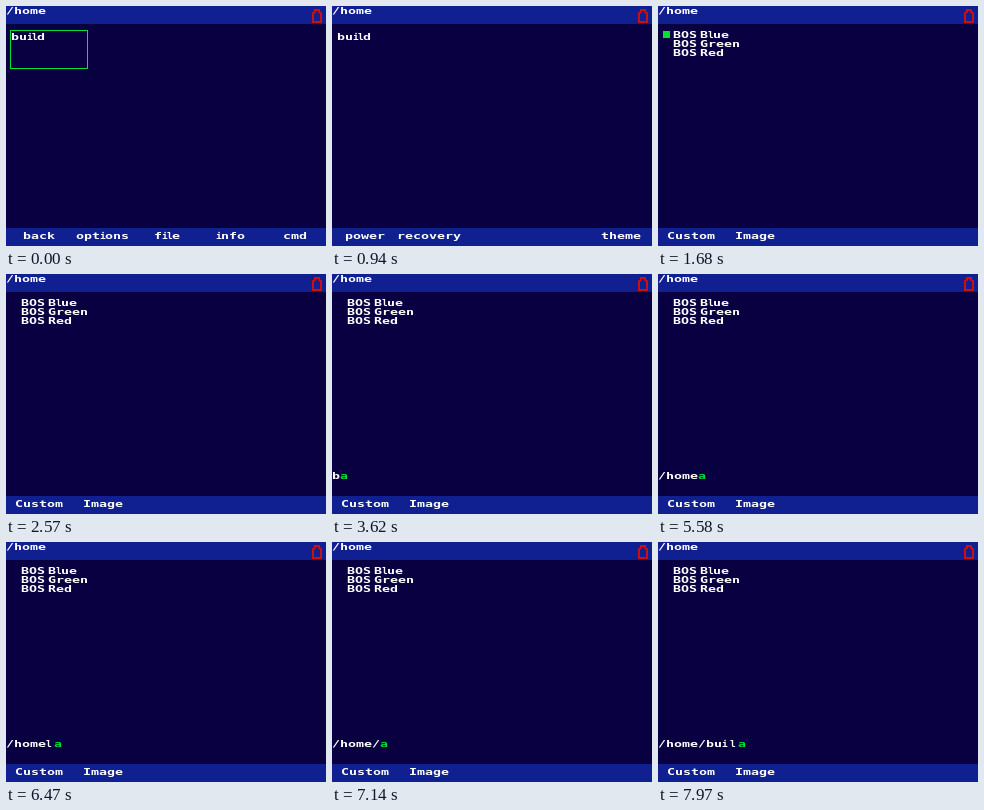
An HTML page with a canvas for the animation above (8 s loop, 320x240 px).

```html
<!DOCTYPE html>
<html lang="en">
<head>
<meta charset="utf-8">
<title>Pocket file manager</title>
<style>
html, body { margin: 0; width: 100%; height: 100%; overflow: hidden; background: #080040; }
canvas { display: block; }
</style>
</head>
<body>
<canvas id="stage" width="320" height="240"></canvas>
<script>
const ctx = document.getElementById('stage').getContext('2d');
const LOOP = 8000, CELL = 8, WIDE = 1.4;
const BAR = '#102090', BODY = '#080040', GREEN = '#00e038', RED = '#cc1010';
const FONT = 'bold 9.5px "DejaVu Sans Mono", monospace';

const screens = [
  [0, 'files', ['back', 'options', 'file', 'info', 'cmd']],
  [890, 'idle', []],
  [940, 'idle', ['power', 'recovery', '', '', 'theme']],
  [1680, 'themes', ['Custom', 'Image']]
];

// Typed text, then the input mode shown as a green cursor
const typing = [
  [2620, '', 'a'], [3620, 'b', 'a'], [4320, '', 'a'],
  [4610, '', '1'], [4760, '/', '1'], [4900, '/', 'a'],
  [5300, '/h', 'a'], [5390, '/ho', 'a'], [5490, '/hom', 'a'], [5580, '/home', 'a'],
  [5730, '/homel', 'a'], [5930, '/homels', 'a'], [6470, '/homel', 'a'], [6610, '/home', 'a'],
  [6910, '/home', '1'], [7050, '/home/', '1'], [7140, '/home/', 'a'],
  [7590, '/home/b', 'a'], [7730, '/home/bu', 'a'],
  [7880, '/home/bui', 'a'], [7970, '/home/buil', 'a']
];

const latest = (list, t) => list.filter(step => step[0] <= t).pop();
const isSlim = c => c === 'l' || c === 'i';
const advance = c => c === ' ' ? 3 : isSlim(c) ? 5 : CELL;
const widthOf = s => [...s].reduce((sum, c) => sum + advance(c), 0);

function rect(x, y, w, h, color) {
  ctx.fillStyle = color;
  ctx.fillRect(x, y, w, h);
}

// Wide lettering; only l and i keep their natural width
function text(s, x, y, color = '#fff', fixed = false) {
  ctx.fillStyle = color;
  ctx.font = FONT;
  for (const c of s) {
    ctx.save();
    ctx.translate(x, y);
    if (!isSlim(c)) ctx.scale(WIDE, 1);
    ctx.fillText(c, 0, 0);
    ctx.restore();
    x += fixed ? CELL : advance(c);
  }
}

function battery() {
  ctx.strokeStyle = RED;
  ctx.lineWidth = 2;
  ctx.stroke(new Path2D('M307 16V7L309 6V4H313V6L315 7V16Z'));
}

function draw(t) {
  const [, view, labels] = latest(screens, t);
  rect(0, 0, 320, 240, BODY);
  rect(0, 0, 320, 18, BAR);
  rect(0, 222, 320, 18, BAR);
  text('/home', 0, 8);
  battery();
  labels.forEach((s, i) => text(s, Math.round(32.5 + 64 * i - widthOf(s) / 2), 233));

  if (view === 'themes') {
    ['Blue', 'Green', 'Red'].forEach((s, i) => text('BOS ' + s, 15, 32 + 9 * i));
    if (t < 2570) rect(5, 25, 7, 7, GREEN);
  } else {
    text('build', 5, 34);
  }
  if (view === 'files') {
    ctx.strokeStyle = GREEN;
    ctx.lineWidth = 1;
    ctx.strokeRect(4.5, 24.5, 77, 38);
  }

  const input = latest(typing, t);
  if (input) {
    const [, typed, mode] = input;
    text(typed, 0, 205, '#fff', true);
    text(mode, typed.length * CELL, 205, GREEN, true);
  }
}

const start = performance.now();
function tick() {
  draw((performance.now() - start) % LOOP);
  requestAnimationFrame(tick);
}
tick();
</script>
</body>
</html>
```
